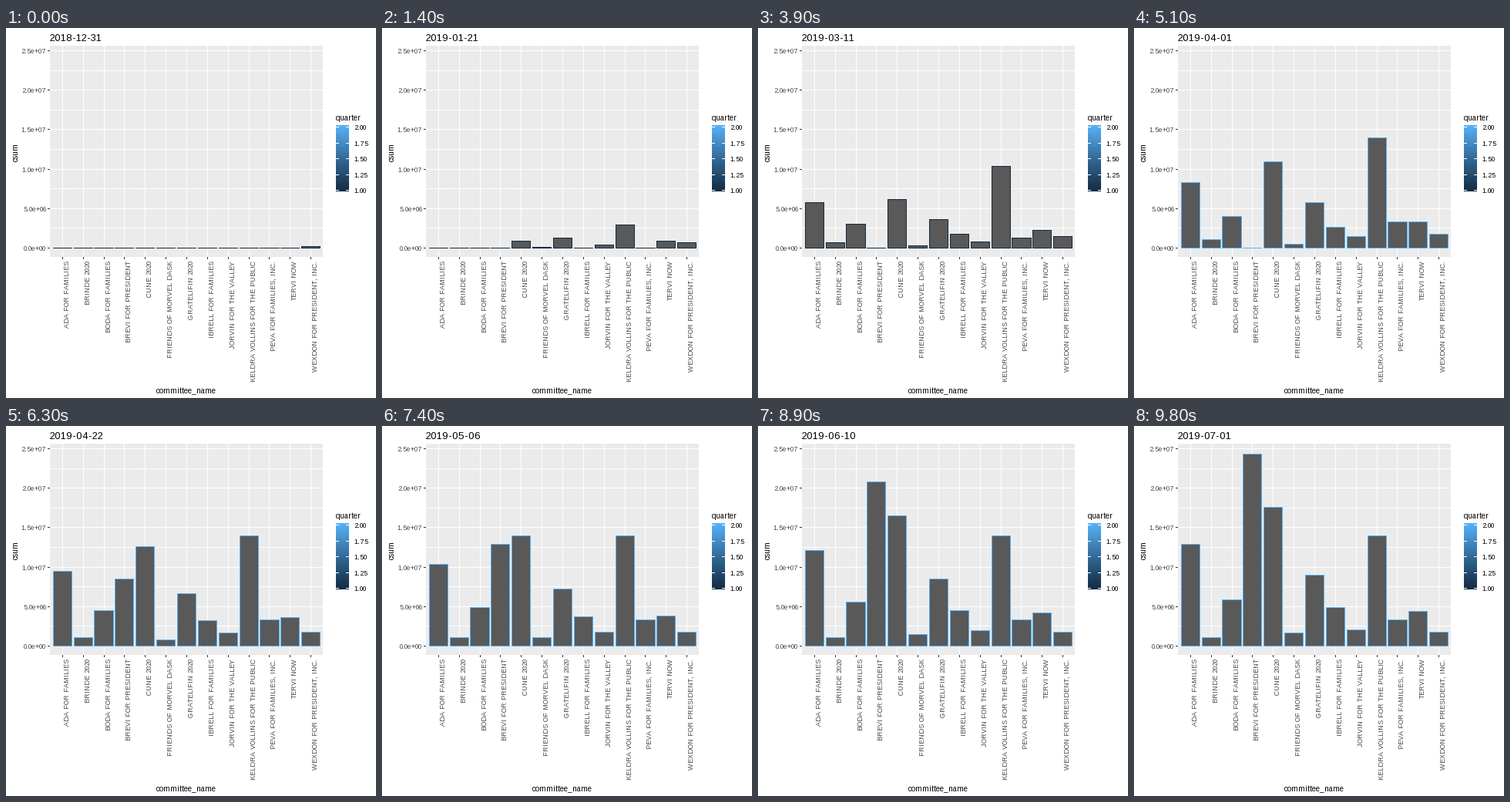
These frames come from a looping animation (480 by 480 pixels, 10000 ms). A matplotlib script:

```python
import numpy as np
import matplotlib.pyplot as plt
from matplotlib.animation import FuncAnimation
from matplotlib.colors import LinearSegmentedColormap
from matplotlib.patches import Rectangle

plt.rcParams["font.family"] = "Liberation Sans"
plt.rcParams["text.hinting_factor"] = 1  # whole-pixel letter spacing

SIZE = 480
LEFT, RIGHT, TOP, BOTTOM = 56.67, 411.35, 23, 297
STEP = (RIGHT - LEFT) / 13.2
ZERO_Y = 285
PX_PER_MILLION = 10.24
SMALL, MEDIUM, LARGE = 9.2, 10.4, 13
BLUES = LinearSegmentedColormap.from_list(
    "quarter", ["#132B43", "#336A98", "#56B1F7"])

# Launch week, then the trend in millions at the weeks in KEY_WEEKS.
KEY_WEEKS = (10, 13, 25)
COMMITTEES = {
    "ADA FOR FAMILIES": (4.8, 5.8, 8.3, 12.85),
    "BRINDE 2020": (6, 0.65, 1.07, 1.07),
    "BODA FOR FAMILIES": (9, 3.05, 4, 5.85),
    "BREVI FOR PRESIDENT": (15, 0, 3.2, 24.3),
    "CUNE 2020": (3, 6.2, 10.95, 17.6),
    "FRIENDS OF MORVEL DASK": (0, 0.25, 0.5, 1.7),
    "GRATELIFIN 2020": (1.5, 3.65, 5.8, 9),
    "IBRELL FOR FAMILIES": (5.5, 1.8, 2.65, 4.9),
    "JORVIN FOR THE VALLEY": (0, 0.8, 1.5, 2.05),
    "KELDRA VOLLINS FOR THE PUBLIC": (2, 10.4, 14, 14),
    "PEVA FOR FAMILIES, INC.": (5, 1.3, 3.35, 3.35),
    "TERVI NOW": (1, 2.2, 3.35, 4.4),
    "WEXDON FOR PRESIDENT, INC.": (-0.5, 1.5, 1.8, 1.8),
}

fig = plt.figure(figsize=(SIZE / 72, SIZE / 72), dpi=72, facecolor="white")
ax = fig.add_axes([0, 0, 1, 1])
ax.set_xlim(0, SIZE)
ax.set_ylim(SIZE, 0)
ax.axis("off")


def box(x, y, w, h, color, z=1):
    return ax.add_patch(Rectangle((x, y), w, h, facecolor=color,
                                  linewidth=0, zorder=z))


def label(x, y, text, size, color="black", ha="left", angle=0):
    return ax.text(x, y, text, fontsize=size, color=color, ha=ha,
                   va="baseline", rotation=angle, rotation_mode="anchor")


def row(millions):
    return round(ZERO_Y - millions * PX_PER_MILLION)


def center(k):
    return LEFT + STEP * (k + 0.6)


def draw_panel():
    left, width = round(LEFT), round(RIGHT) - round(LEFT)
    box(left, TOP, width, BOTTOM - TOP, "#EBEBEB")
    for i in range(11):
        y = row(2.5 * i)
        box(left, y, width, 1, "white")
        if i % 2 == 0:
            box(left - 3, y, 3, 1, "#333333")
            label(52, y + 4, f"{2.5e6 * i:.1e}", SMALL, "#4D4D4D", "right")
    for k, name in enumerate(COMMITTEES):
        x = round(center(k))
        box(x, TOP, 1, BOTTOM - TOP, "white")
        box(x, BOTTOM, 1, 3, "#333333")
        label(x + 9, 302, name, SMALL, "#4D4D4D", "right", 90)
    label(234, 473, "committee_name", MEDIUM, ha="center")
    label(16, 161, "csum", MEDIUM, ha="center", angle=90)


def draw_legend():
    x, y, w, h = 428, 126, 17, 86
    label(x, 120, "quarter", MEDIUM)
    for i in range(h):
        box(x, y + i, w, 1, BLUES(1 - i / (h - 1)))
    for i in range(5):
        tick = round(128.3 + 20.5 * i)
        box(x, tick, 4, 1, "white", 2)
        box(x + w - 4, tick, 4, 1, "white", 2)
        label(451, tick + 4, f"{2 - i / 4:.2f}", SMALL)


def week_at(frame):
    """Week number; a half marks the single step between two weeks."""
    if frame < 83:
        week, rest = divmod(frame + 1, 4)
        return week + 0.5 * (rest == 3)
    week, rest = divmod(frame - 83, 3)
    return 21 + week + 0.5 * (rest == 2)


def raised(week, launch, *trend):
    """Millions so far: the trend, eased in from the launch week."""
    ramp = max(KEY_WEEKS[0] - launch, 1)
    ease = np.clip((week - launch) / ramp, 0, 1) ** 0.75
    return ease * np.interp(week, KEY_WEEKS, trend)


def add_bar(k):
    x0 = round(center(k) - 0.45 * STEP)
    x1 = round(center(k) + 0.45 * STEP) + 1
    return (box(x0, 0, x1 - x0, 1, "black", 3),
            box(x0 + 1, 0, x1 - x0 - 2, 0, "#595959", 4))


draw_panel()
draw_legend()
title = label(round(LEFT), 17, "", LARGE)
bars = [add_bar(k) for k in range(len(COMMITTEES))]


def draw(frame):
    week = week_at(frame)
    title.set_text(str(np.datetime64("2018-12-31") + 7 * int(week)))
    edge = BLUES(float(np.clip(week - 12, 0, 1)))
    for (outer, inner), plan in zip(bars, COMMITTEES.values()):
        y = row(raised(week, *plan))
        height = ZERO_Y - y
        outer.set(y=y, height=height + 1, facecolor=edge)
        inner.set(y=y + 1, height=max(height - 1, 0))
    return [title]


anim = FuncAnimation(fig, draw, frames=100, interval=100, repeat=True)
plt.show()
```
